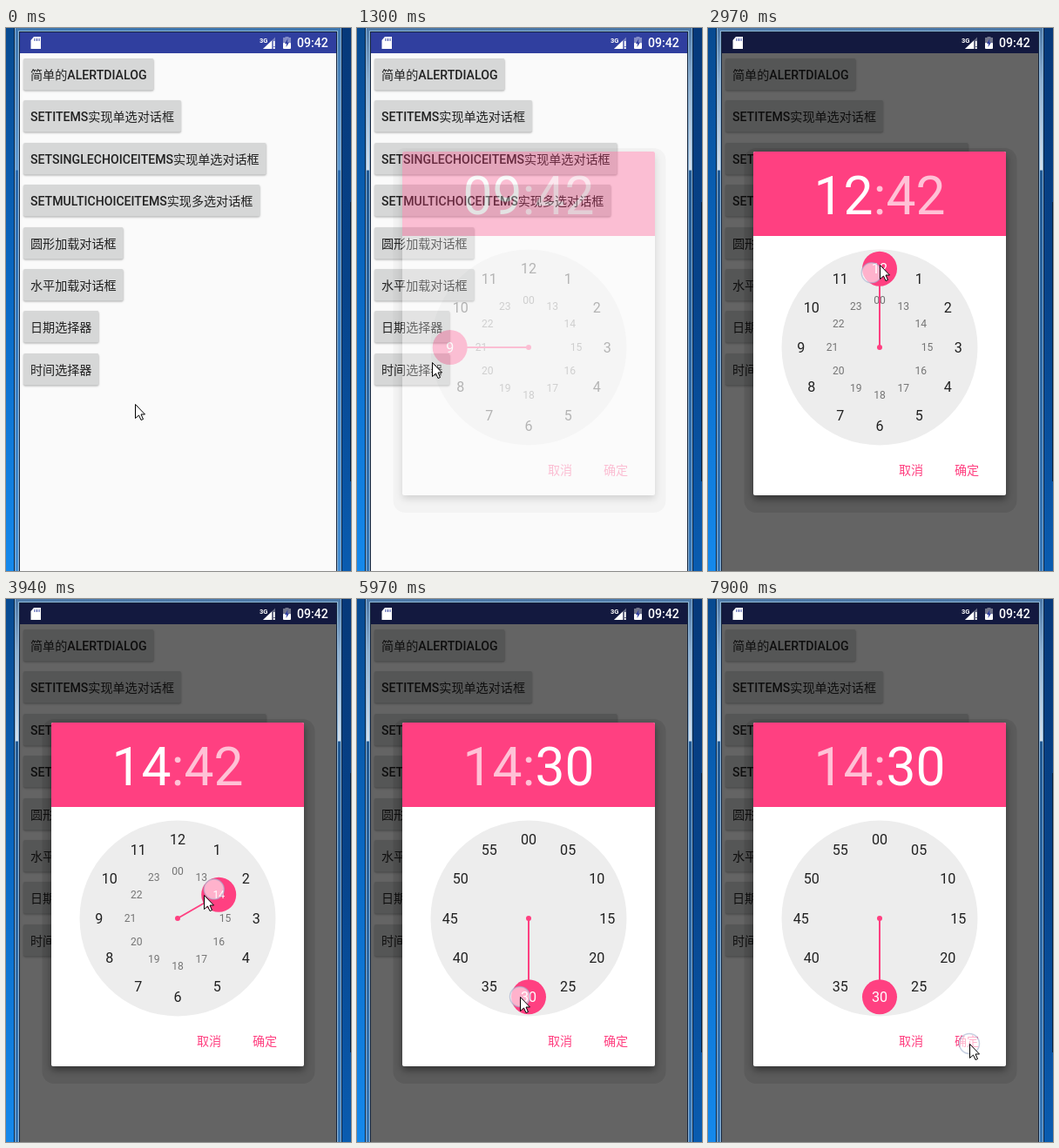
These frames come from a looping animation (396x624 px, 8000 ms). An HTML page with a canvas:

```html
<!DOCTYPE html>
<html lang="zh">
<head>
<meta charset="utf-8">
<style>
html, body { margin: 0; width: 100%; height: 100%; overflow: hidden; }
canvas { display: block; }
</style>
</head>
<body>
<canvas id="stage" width="396" height="624"></canvas>
<script>
const W = 396, H = 624, LOOP = 8000, STEP = 130;
const PINK = '#ff4081', FONT = 'Roboto, "Noto Sans CJK SC", "Noto Sans CJK", sans-serif';
const CENTER = [197, 367], OUTER = 90.3, INNER = 54.5, KNOB = 20;

const stage = document.getElementById('stage').getContext('2d');
const layer = document.createElement('canvas');
layer.width = W; layer.height = H;
const dialog = layer.getContext('2d');

const OPEN = { from: 910, to: 1250 }, HOUR = { from: 2730, to: 4500 },
  MINUTE = { from: 5720, to: 6800 }, CONFIRM = { from: 7790, to: LOOP };
const presses = [OPEN, HOUR, MINUTE, CONFIRM];

const HOME = [148, 432];
const moves = [
  { from: 120, to: 700, end: [86, 384] },
  { from: 1300, to: 2860, end: [197, 272] },
  { from: 2860, to: 3250, end: [286, 308] },
  { from: 3250, to: 3900, end: [227, 340] },
  { from: HOUR.to, to: 5070, end: [266, 467] },
  { from: 5070, to: 5550, end: [187, 457] },
  { from: MINUTE.to, to: 7600, end: [300, 511] }
];

const labels = ['简单的ALERTDIALOG', 'SETITEMS实现单选对话框', 'SETSINGLECHOICEITEMS实现单选对话框',
  'SETMULTICHOICEITEMS实现多选对话框', '圆形加载对话框', '水平加载对话框', '日期选择器', '时间选择器'];

const pad = n => String(n).padStart(2, '0');
const ramp = (t, a, b) => Math.min(1, Math.max(0, (t - a) / (b - a)));

const pointerAt = t => moves.reduce((pos, { from, to, end }) =>
  pos.map((v, i) => v + (end[i] - v) * ramp(t, from, to)), HOME);
const touchAt = t => pointerAt(t - STEP);

// Nearest of the twelve dial marks to a point
function markAt([x, y]) {
  const dx = x - CENTER[0], dy = CENTER[1] - y;
  const index = (Math.round(Math.atan2(dx, dy) / Math.PI * 6) + 12) % 12;
  return { index, inner: Math.hypot(dx, dy) < (OUTER + INNER) / 2 };
}

function hourAt(t) {
  if (t < HOUR.from) return 9;
  const { index, inner } = markAt(touchAt(Math.min(t, HOUR.to)));
  return inner ? (index && index + 12) : index || 12;
}

const minuteAt = t =>
  t < MINUTE.from ? 42 : markAt(touchAt(Math.min(t, MINUTE.to))).index * 5;

function rect(c, color, x, y, w, h, r = 0) {
  c.fillStyle = color;
  c.beginPath();
  c.roundRect(x, y, w, h, r);
  c.fill();
}

function disc(c, color, x, y, r) {
  c.fillStyle = color;
  c.beginPath();
  c.arc(x, y, r, 0, 7);
  c.fill();
}

function poly(c, color, points) {
  c.fillStyle = color;
  c.beginPath();
  points.forEach(p => c.lineTo(...p));
  c.closePath();
  c.fill();
}

function text(c, s, x, y, size, color, weight = 400, align = 'left') {
  c.font = `${weight} ${size}px ${FONT}`;
  c.textAlign = align;
  c.fillStyle = color;
  c.fillText(s, x, Math.round(y));
}

function shadow(c, color, blur, dy) {
  c.shadowColor = color;
  c.shadowBlur = blur;
  c.shadowOffsetY = dy;
}

function vertical(...stops) {
  const g = stage.createLinearGradient(0, 0, 0, H);
  stops.forEach(([y, color]) => g.addColorStop(y / H, color));
  return g;
}

function drawDesktop(active) {
  const c = stage;
  rect(c, vertical([0, '#084a90'], [300, '#0a69c4'], [H, '#1589ec']), 0, 0, 200, H);
  rect(c, vertical([0, '#06397a'], [300, '#07438a'], [H, '#0a5cb0']), 200, 0, 196, H);
  rect(c, '#06203f', 395, 200, 1, 321);
  const glass = active
    ? vertical([0, '#4b78a8'], [60, '#8fb0d0'], [163, '#d3e0ec'], [164, '#225a94'], [H, '#3677b8'])
    : vertical([0, '#3f78b0'], [163, '#5f9bd4'], [164, '#2a6bb0'], [H, '#4590d6']);
  rect(c, '#0c2440', 9, 0, 377, H);
  rect(c, '#86b2da', 10, 0, 375, H);
  rect(c, glass, 11, 0, 373, H);
  rect(c, '#8fb6d8', 14, 3, 367, H);
  rect(c, '#14243c', 15, 4, 365, H);
  rect(c, '#fafafa', 16, 5, 363, H);
  rect(c, '#303f9f', 16, 5, 363, 24);
}

function drawButtons() {
  labels.forEach((label, i) => {
    const y = Math.round(35 + i * 48.4);
    stage.font = `500 14.1px ${FONT}`;
    const width = stage.measureText(label).width + 16;
    shadow(stage, 'rgba(0,0,0,.3)', 2, 1);
    rect(stage, '#d6d7d7', 20, y, width, 36.5, 2);
    shadow(stage, 'transparent', 0, 0);
    text(stage, label, 28, y + 24, 14.1, '#212121', 500);
  });
}

function drawStatus() {
  const c = stage;
  poly(c, '#fff', [[32, 10], [40, 10], [40, 24], [28.5, 24], [28.5, 14]]);
  for (let x = 32.5; x < 38; x += 2.5) rect(c, '#303f9f', x, 12, 1, 3);
  text(c, '3G', 291, 17, 7.5, '#fff', 700);
  poly(c, 'rgba(255,255,255,.35)', [[309, 10.5], [309, 24], [295, 24]]);
  poly(c, '#fff', [[305, 14.5], [305, 24], [295, 24]]);
  rect(c, '#fff', 307, 15, 1.6, 6);
  rect(c, '#fff', 307, 22, 1.6, 2);
  rect(c, 'rgba(255,255,255,.4)', 318, 11, 9, 7);
  rect(c, 'rgba(255,255,255,.4)', 320.5, 10, 4, 1);
  rect(c, '#fff', 318, 17, 9, 7, 1);
  poly(c, '#303f9f', [[323.5, 12], [320, 18], [322, 18], [321.5, 22], [325, 16.5], [323, 16.5]]);
  text(c, '09:42', 334, 22, 14.1, '#fff', 500);
}

const polar = (turn, r) =>
  [CENTER[0] + r * Math.sin(turn * 2 * Math.PI), CENTER[1] - r * Math.cos(turn * 2 * Math.PI)];

function drawNumbers(minutes, lit) {
  for (let i = 0; i < 12; i++) {
    const put = (s, r, size, color) => {
      const [x, y] = polar(i / 12, r);
      text(dialog, s, x, y + size * .342, size, lit ? '#fff' : color, 400, 'center');
    };
    put(minutes ? pad(i * 5) : String(i || 12), OUTER, 16.1, '#212121');
    if (!minutes) put(i ? String(i + 12) : '00', INNER, 12.1, '#757575');
  }
}

function drawDial(minutes, value, alpha) {
  if (!alpha) return;
  const c = dialog;
  const inner = !minutes && (value === 0 || value > 12);
  const [x, y] = polar(value / (minutes ? 60 : 12), inner ? INNER : OUTER);
  c.save();
  c.globalAlpha = alpha;
  drawNumbers(minutes, false);
  disc(c, PINK, ...CENTER, 3);
  c.strokeStyle = PINK;
  c.lineWidth = 2;
  c.beginPath();
  c.moveTo(...CENTER);
  c.lineTo(x, y);
  c.stroke();
  disc(c, PINK, x, y, KNOB);
  c.clip();
  drawNumbers(minutes, true);
  if (minutes && value % 5) disc(c, '#fff', x, y, 2);
  c.restore();
}

function drawDialog(t) {
  const c = dialog;
  const hour = hourAt(t), minute = minuteAt(t), minutes = t > HOUR.to;
  c.clearRect(0, 0, W, H);
  rect(c, 'rgba(0,0,0,.09)', 41.5, 138, 313, 419, 14);
  shadow(c, 'rgba(0,0,0,.45)', 9, 4);
  rect(c, '#fff', 52, 142, 290, 395, 2);
  shadow(c, 'transparent', 0, 0);
  rect(c, PINK, 52, 142, 290, 97, [2, 2, 0, 0]);

  const dim = 'rgba(255,255,255,.68)';
  text(c, pad(hour), 189.5, 214, 60.5, minutes ? dim : '#fff', 400, 'right');
  text(c, ':', 197, 214, 60.5, dim, 400, 'center');
  text(c, pad(minute), 204.5, 214, 60.5, minutes ? '#fff' : dim);

  disc(c, '#ededed', ...CENTER, 112.5);
  drawDial(false, hour, 1 - ramp(t, HOUR.to, HOUR.to + 350));
  drawDial(true, minute, ramp(t, HOUR.to + 150, HOUR.to + 650));
  text(c, '取消', 219, 513, 14.1, PINK, 500);
  text(c, '确定', 283, 513, 14.1, PINK, 500);
}

function drawPointer(t) {
  const c = stage;
  if (presses.some(({ from, to }) => t >= from && t < to)) {
    const [x, y] = touchAt(t);
    disc(c, 'rgba(255,255,255,.6)', x, y, 11.5);
    c.lineWidth = 1.5;
    c.strokeStyle = 'rgba(160,175,205,.6)';
    c.stroke();
  }
  const [x, y] = pointerAt(t).map(Math.round);
  poly(c, '#fff', [[0, 0], [0, 16], [4, 12.5], [6.5, 18], [9, 17], [6.5, 11.5], [11, 11.5]]
    .map(([dx, dy]) => [x + dx + .5, y + dy + .5]));
  c.lineWidth = 1;
  c.strokeStyle = '#000';
  c.stroke();
}

function draw(now) {
  const t = Math.floor((now % LOOP + 5) / STEP) * STEP;
  drawDesktop(t >= OPEN.from);
  drawButtons();
  rect(stage, `rgba(0,0,0,${.6 * ramp(t, 1300, 1700)})`, 16, 5, 363, H);
  drawStatus();
  const shown = ramp(t, 1170, 1580);
  if (shown) {
    drawDialog(t);
    stage.globalAlpha = shown;
    stage.drawImage(layer, 0, 0);
    stage.globalAlpha = 1;
  }
  drawPointer(t);
}

let start;
function frame(now) {
  start ??= now;
  draw(Math.max(0, now - start));
  requestAnimationFrame(frame);
}
requestAnimationFrame(frame);
</script>
</body>
</html>
```
